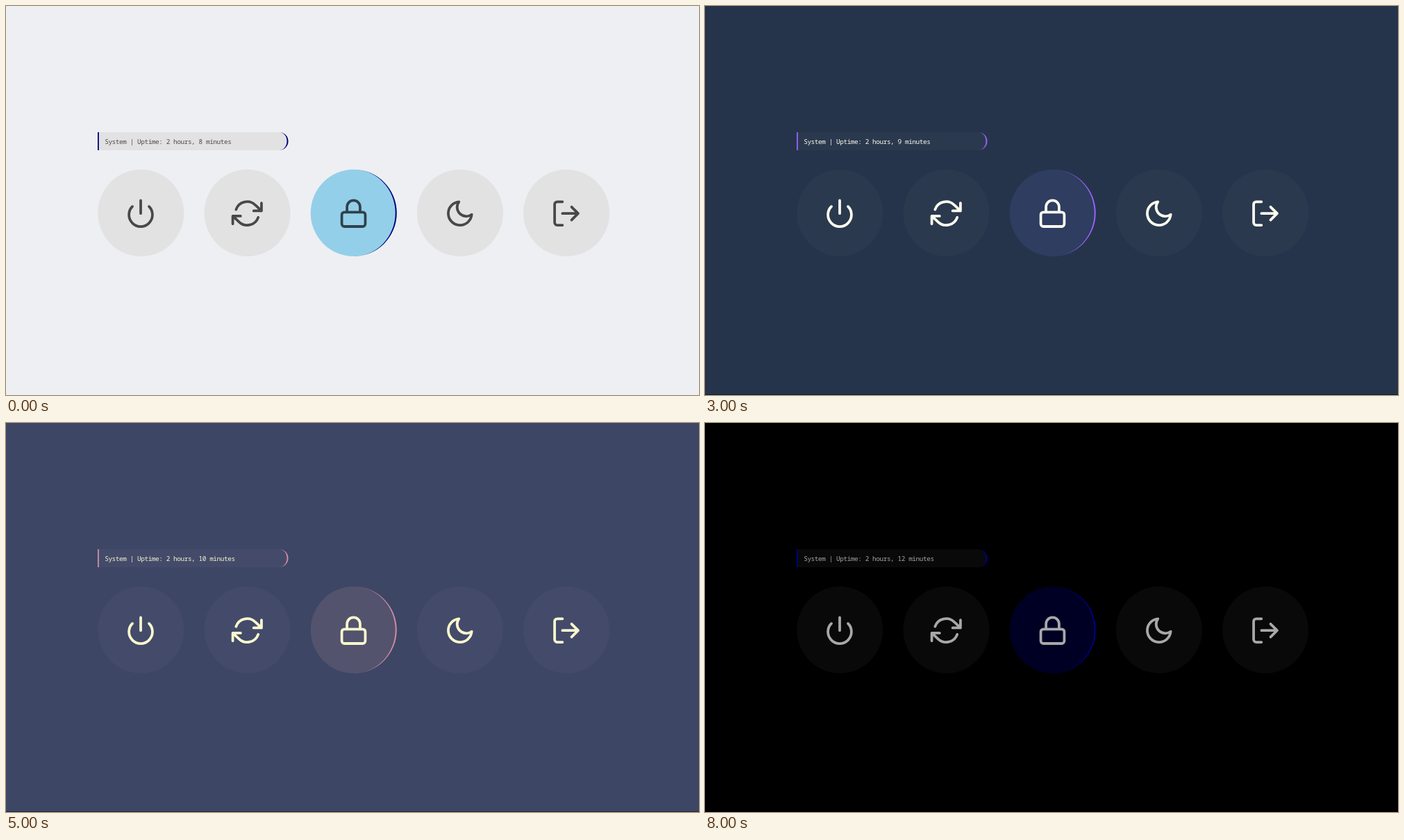
Animation of 998 by 561 pixels, one loop 9 s. Source, as an HTML page with a canvas:

```html
<!DOCTYPE html>
<html lang="en">
<head>
<meta charset="utf-8">
<title>Power menu themes</title>
<style>
  html, body { margin: 0; width: 100%; height: 100%; overflow: hidden; }
  canvas { display: block; width: 998px; height: 561px; }
</style>
</head>
<body>
<canvas id="stage" width="998" height="561"></canvas>
<script>
const W = 998, H = 561, STEP = 1000;
const canvas = document.getElementById("stage");
const ctx = canvas.getContext("2d");
const ratio = window.devicePixelRatio || 1;
canvas.width = W * ratio;
canvas.height = H * ratio;

const theme = (minutes, bg, card, active, accent, ink) =>
  ({ minutes, bg, card, active, accent, ink });

const themes = [
  theme(8, "#eeeff2", "#e2e2e2", "#94cfe9", "#000080", "rgba(0,0,0,.68)"),
  theme(9, "#270f25", "#2d142a", "#430c2c", "#f0443f", "#b9a8b8"),
  theme(9, "#272438", "#2d2a3e", "#37304f", "#c65a9c", "#dcd4d6"),
  theme(9, "#26344b", "#2b394f", "#2e3d60", "#9a62fa", "#fffff0"),
  theme(10, "#26344b", "#2b394f", "#38455f", "#c07fd0", "#fffff0"),
  theme(10, "#3e4665", "#444b6a", "#53536d", "#cf8ca4", "#fbf8cf"),
  theme(11, "#5a698c", "#606d91", "#6f7fab", "#f7809c", "#ffffff"),
  theme(11, "#2d3446", "#333a4b", "#384058", "#8085c0", "#d4d6dc"),
  theme(12, "#000000", "#090909", "#000024", "#00008b", "#a8a8ab")
];

// Icons live on a 24-unit grid
const icons = [
  "M18.36 6.64a9 9 0 1 1-12.73 0M12 2v10",
  "M23 4v6h-6M1 20v-6h6M3.51 9a9 9 0 0 1 14.85-3.36L23 10M1 14l4.64 4.36A9 9 0 0 0 20.49 15",
  "M5 11h14a2 2 0 0 1 2 2v7a2 2 0 0 1-2 2H5a2 2 0 0 1-2-2v-7a2 2 0 0 1 2-2zM7 11V7a5 5 0 0 1 10 0v4",
  "M21 12.79A9 9 0 1 1 11.21 3 7 7 0 0 0 21 12.79z",
  "M9 21H5a2 2 0 0 1-2-2V5a2 2 0 0 1 2-2h4M16 17l5-5-5-5M21 12H9"
].map(d => new Path2D(d));

const ACTIVE = 2, ICON_SCALE = 1.88;
const BAR = { x: 132, y: 182, w: 274.5, h: 26, r: 13 };

// Right-hand border that tapers off along a rounded edge
function crescent(x, y, rx, ry, color) {
  ctx.beginPath();
  ctx.ellipse(x, y, rx, ry, 0, -Math.PI / 2, Math.PI / 2);
  ctx.ellipse(x, y, rx - 2, ry, 0, Math.PI / 2, -Math.PI / 2, true);
  ctx.fillStyle = color;
  ctx.fill();
}

function drawBar(t) {
  const { x, y, w, h, r } = BAR;
  const cx = x + w - r, cy = y + h / 2;
  ctx.fillStyle = t.card;
  ctx.beginPath();
  ctx.moveTo(x, y);
  ctx.lineTo(cx, y);
  ctx.arc(cx, cy, r, -Math.PI / 2, Math.PI / 2);
  ctx.lineTo(x, y + h);
  ctx.fill();
  crescent(cx, cy, r, r, t.accent);
  ctx.fillRect(x, y, 1.8, h);

  ctx.fillStyle = t.ink;
  ctx.font = '9.4px "Noto Sans Mono", "DejaVu Sans Mono", monospace';
  ctx.letterSpacing = "-0.42px";
  ctx.textBaseline = "alphabetic";
  ctx.fillText(`System | Uptime: 2 hours, ${t.minutes} minutes`, 142.2, 198.6);
}

function drawButton(t, i) {
  const x = 194.3 + 153.2 * i, y = 298.4, rx = 62, ry = 62.6;
  ctx.fillStyle = i === ACTIVE ? t.active : t.card;
  ctx.beginPath();
  ctx.ellipse(x, y, rx, ry, 0, 0, Math.PI * 2);
  ctx.fill();
  if (i === ACTIVE) crescent(x, y, rx, ry, t.accent);

  ctx.save();
  ctx.translate(194 + 153.25 * i, 299.2);
  ctx.scale(ICON_SCALE, ICON_SCALE);
  ctx.translate(-12, -12);
  ctx.strokeStyle = t.ink;
  ctx.lineWidth = 2;
  ctx.lineCap = ctx.lineJoin = "round";
  ctx.stroke(icons[i]);
  ctx.restore();
}

function draw(index) {
  const t = themes[index];
  ctx.setTransform(ratio, 0, 0, ratio, 0, 0);
  ctx.fillStyle = t.bg;
  ctx.fillRect(0, 0, W, H);
  if (index > 0) {
    ctx.fillStyle = "rgba(0,0,0,.5)";
    ctx.fillRect(0, H - 1, W, 1);
  }
  drawBar(t);
  icons.forEach((_, i) => drawButton(t, i));
}

const start = performance.now();
function tick() {
  const elapsed = Math.max(0, performance.now() - start);
  draw(Math.floor(elapsed / STEP) % themes.length);
  requestAnimationFrame(tick);
}
tick();
</script>
</body>
</html>
```
